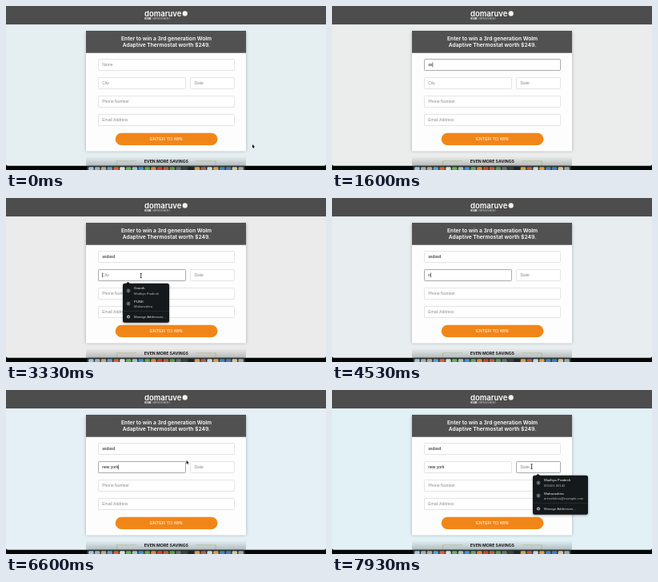
An HTML page with a canvas that plays this animation: 400x205 px, repeating every 8000 ms.

```html
<!DOCTYPE html>
<html lang="en">
<head>
<meta charset="utf-8">
<title>Prize form</title>
<style>
html, body { margin: 0; width: 100%; height: 100%; overflow: hidden; background: #060707; }
canvas { display: block; width: 100vw; height: 100vh; }
</style>
</head>
<body>
<canvas id="stage"></canvas>
<script>
const W = 400, H = 205, LOOP = 8000, PAGE_END = 199.7;
const canvas = document.getElementById('stage');
const ctx = canvas.getContext('2d');
const ARIAL = '"Liberation Sans", Arial, sans-serif';
const INTER = 'Inter, sans-serif';

const fields = {
  name: { x: 115, y: 66, w: 171, h: 15, hint: 'Name' },
  city: { x: 115, y: 89, w: 110, h: 15, hint: 'City' },
  state: { x: 230, y: 89, w: 56, h: 15, hint: 'State' },
  phone: { x: 115, y: 112, w: 171, h: 15, hint: 'Phone Number' },
  email: { x: 115, y: 135, w: 171, h: 15, hint: 'Email Address' }
};
// Focus changes, and the time of every key press
const clicks = [[470, 'name'], [3130, 'city'], [6950, 'state']];
const typed = {
  name: ['asdasd', [1000, 1470, 1990, 2270, 2400, 2530]],
  city: ['new york', [4530, 4730, 4950, 5600, 5800, 5930, 6070, 6130]]
};
const menus = [
  { from: 3200, to: 4530, x: 146, w: 58, rows: ['Garoth', 'Madhya Pradesh', 'PUNE', 'Maharashtra'] },
  { from: 7010, to: LOOP, x: 251, w: 69, rows: ['Madhya Pradesh', '055501 00142', 'Maharashtra', 'arinveloksa@example.com'] }
];
const mousePath = [
  [0, 308, 173], [70, 308, 173], [270, 190, 74], [2700, 190, 74],
  [3030, 168.7, 97], [6330, 168.7, 97], [6600, 225.6, 88], [6850, 249.6, 95.6]
];
const mouseHidden = [[1000, 2700], [4530, 6330]];
const tints = [
  [0, 229, 239, 242], [1130, 234, 237, 236], [2070, 236, 236, 236],
  [3330, 235, 235, 235], [5530, 229, 239, 242], [6600, 228, 240, 245], [7930, 226, 241, 245]
];
const dock = ['#9cc6e2', '#a9adab', '#b8a98c', '#5f9fd0', '#d4623f', '#dfe0dc', '#6cb05a', '#a8c2b8',
  '#4a90d0', '#62a95a', '#e08a35', '#c9472f', '#b5643c', '#5c9c50', '#6a706e', '#3a4442', '#1d2422',
  '#d9a04a', '#b9584a', '#d5d7d4', '#e0a040', '#3f86c4', '#4f7ba4', '#d8c49a', '#a2a8a6'];

const ease = u => u * u * (3 - 2 * u);

function sample(keys, t, curve = u => u) {
  let i = 0;
  while (i < keys.length - 1 && keys[i + 1][0] <= t) i++;
  const a = keys[i], b = keys[i + 1] || a;
  const u = b === a ? 0 : curve((t - a[0]) / (b[0] - a[0]));
  return a.slice(1).map((v, k) => v + (b[k + 1] - v) * u);
}

function rect(x, y, w, h, fill) {
  ctx.fillStyle = fill;
  ctx.fillRect(x, y, w, h);
}

function pill(x, y, w, h, r, fill) {
  ctx.beginPath();
  ctx.roundRect(x, y, w, h, r);
  ctx.fillStyle = fill;
  ctx.fill();
}

function disc(x, y, r, fill) {
  ctx.beginPath();
  ctx.arc(x, y, r, 0, 7);
  ctx.fillStyle = fill;
  ctx.fill();
}

function text(str, x, y, size, fill, family = ARIAL, weight = 400, align = 'left') {
  ctx.font = `${weight} ${size}px ${family}`;
  ctx.textAlign = align;
  ctx.fillStyle = fill;
  ctx.fillText(str, x, y);
}

function shadow(color, blur, dy) {
  const k = canvas.width / W;
  ctx.shadowColor = color;
  ctx.shadowBlur = blur * k;
  ctx.shadowOffsetY = dy * k;
}

function drawPage(t) {
  rect(0, 0, W, H, '#060707');
  pill(0, 0, W, PAGE_END, [0, 0, 2.5, 2.5], `rgb(${sample(tints, t).map(Math.round)})`);
  rect(0, 0, W, 23, '#4e4d4d');
  rect(0, 23, W, 0.6, 'rgba(0,0,0,.1)');
  text('domaruve', 173, 12.6, 9.5, '#fff', INTER, 600);
  disc(223.7, 9.4, 3.1, '#f4f4ee');
  text('HOME', 173, 17.2, 2.9, '#fff', INTER, 700);
  text('IMPROVEMENT', 183.6, 17.2, 2.9, '#b9b9b9', INTER, 500);

  ctx.save();
  shadow('rgba(0,0,0,.3)', 3.5, 0.8);
  rect(100, 31, 200, 150.5, '#fdfdfd');
  ctx.restore();
  rect(100, 31, 200, 27.7, '#525151');
  text('Enter to win a 3rd generation Wolm', 200.5, 43.2, 6.7, '#fff', INTER, 600, 'center');
  text('Adaptive Thermostat worth $249.', 200.5, 51, 6.7, '#fff', INTER, 600, 'center');

  pill(136.7, 158.8, 127.8, 15.2, 7.6, '#f18618');
  text('ENTER TO WIN', 200.3, 168.2, 5.6, '#fff', ARIAL, 400, 'center');

  for (const x of [138, 237.5]) rect(x, 193.5, 25, 0.8, '#c3d49c');
  for (const x of [138, 261.7]) rect(x, 193.5, 0.8, 5.5, '#c3d49c');
  text('EVEN MORE SAVINGS', 200.3, 196.3, 5.2, '#1c1c1c', INTER, 700, 'center');
}

function drawField(key, t) {
  const f = fields[key];
  const last = clicks.filter(c => c[0] <= t).pop();
  const focused = last && last[1] === key;
  const [str, times] = typed[key] || ['', []];
  const count = times.filter(k => k <= t).length;
  const value = str.slice(0, count);
  const base = f.y + 9.2;

  ctx.beginPath();
  ctx.roundRect(f.x + 0.5, f.y + 0.5, f.w - 1, f.h - 1, 0.8);
  ctx.fillStyle = '#fff';
  ctx.fill();
  ctx.lineWidth = 0.8;
  ctx.strokeStyle = focused ? '#929698' : '#dedede';
  ctx.stroke();

  const left = f.x + 5.2;
  text(value || f.hint, left, base, 5, value ? '#161616' : '#8c8c8c');
  if (focused) {
    const since = t - Math.max(last[0], count ? times[count - 1] : 0);
    const end = left + (value ? ctx.measureText(value).width : 0);
    if (since % 1000 < 500) rect(end + 0.1, base - 4.8, 0.6, 6, '#222');
  }
}

function drawPerson(x, y) {
  ctx.beginPath();
  ctx.arc(x, y, 2, 0, 7);
  ctx.lineWidth = 0.5;
  ctx.strokeStyle = '#c4c7c9';
  ctx.stroke();
  disc(x, y - 0.5, 0.7, '#c4c7c9');
  rect(x - 1, y + 0.6, 2, 0.6, '#c4c7c9');
}

function drawMenu(m) {
  ctx.save();
  shadow('rgba(0,0,0,.35)', 3, 1);
  pill(m.x, 106.8, m.w, 48.9, 2.5, '#15191b');
  ctx.restore();
  ctx.beginPath();
  ctx.moveTo(m.x + 4, 107);
  ctx.lineTo(m.x + 6.5, 104.7);
  ctx.lineTo(m.x + 9, 107);
  ctx.fillStyle = '#15191b';
  ctx.fill();
  const x = m.x + 14;
  m.rows.forEach((row, i) => {
    const y = [114.4, 120.8, 130.6, 136.8][i];
    if (i % 2) text(row, x, y, 4.1, '#b4b7b9');
    else text(row, x, y, 4.4, '#f1f1f1', ARIAL, 500);
  });
  rect(m.x, 141.2, m.w, 0.5, '#34383a');
  drawPerson(m.x + 7, 116);
  drawPerson(m.x + 7, 132);
  disc(m.x + 7, 148.6, 2, '#c4c7c9');
  disc(m.x + 7, 148.6, 0.9, '#15191b');
  text('Manage Addresses...', x, 150.3, 4.2, '#d5d7d8');
}

function drawDock() {
  const shade = ctx.createLinearGradient(0, 188, 0, PAGE_END);
  shade.addColorStop(0, 'rgba(0,0,0,0)');
  shade.addColorStop(1, 'rgba(0,0,0,.22)');
  rect(100, 188, 200, PAGE_END - 188, shade);
  pill(101, PAGE_END, 198, 9, 2, '#2a3331');
  dock.forEach((c, i) => pill(103.2 + i * 7.8, 201.2, 6.4, 6.4, 1.4, c));
}

function drawMouse(t) {
  if (mouseHidden.some(([a, b]) => t >= a && t < b)) return;
  const [x, y] = sample(mousePath, t, ease);
  const inField = Object.values(fields).some(f => x > f.x && x < f.x + f.w && y > f.y && y < f.y + f.h);
  if (inField) {
    rect(x - 0.35, y - 2.8, 0.8, 5.6, '#222');
    rect(x - 1.3, y - 3.1, 2.6, 0.7, '#333');
    rect(x - 1.3, y + 2.4, 2.6, 0.7, '#333');
    return;
  }
  ctx.save();
  ctx.translate(x, y);
  ctx.beginPath();
  for (const [px, py] of [[0, 0], [0, 4.4], [1, 3.5], [1.7, 5.1], [2.4, 4.8], [1.7, 3.2], [3.1, 3.1]]) ctx.lineTo(px, py);
  ctx.closePath();
  ctx.lineWidth = 0.9;
  ctx.strokeStyle = '#fff';
  ctx.stroke();
  ctx.fillStyle = '#000';
  ctx.fill();
  ctx.restore();
}

function resize() {
  const dpr = window.devicePixelRatio || 1;
  canvas.width = Math.round(innerWidth * dpr);
  canvas.height = Math.round(innerHeight * dpr);
}

let start;
function frame(now) {
  if (start === undefined) start = now;
  const t = (now - start) % LOOP;
  ctx.setTransform(canvas.width / W, 0, 0, canvas.height / H, 0, 0);
  drawPage(t);
  Object.keys(fields).forEach(key => drawField(key, t));
  menus.filter(m => t >= m.from && t < m.to).forEach(drawMenu);
  drawDock();
  drawMouse(t);
  requestAnimationFrame(frame);
}

addEventListener('resize', resize);
resize();
requestAnimationFrame(frame);
</script>
</body>
</html>
```
